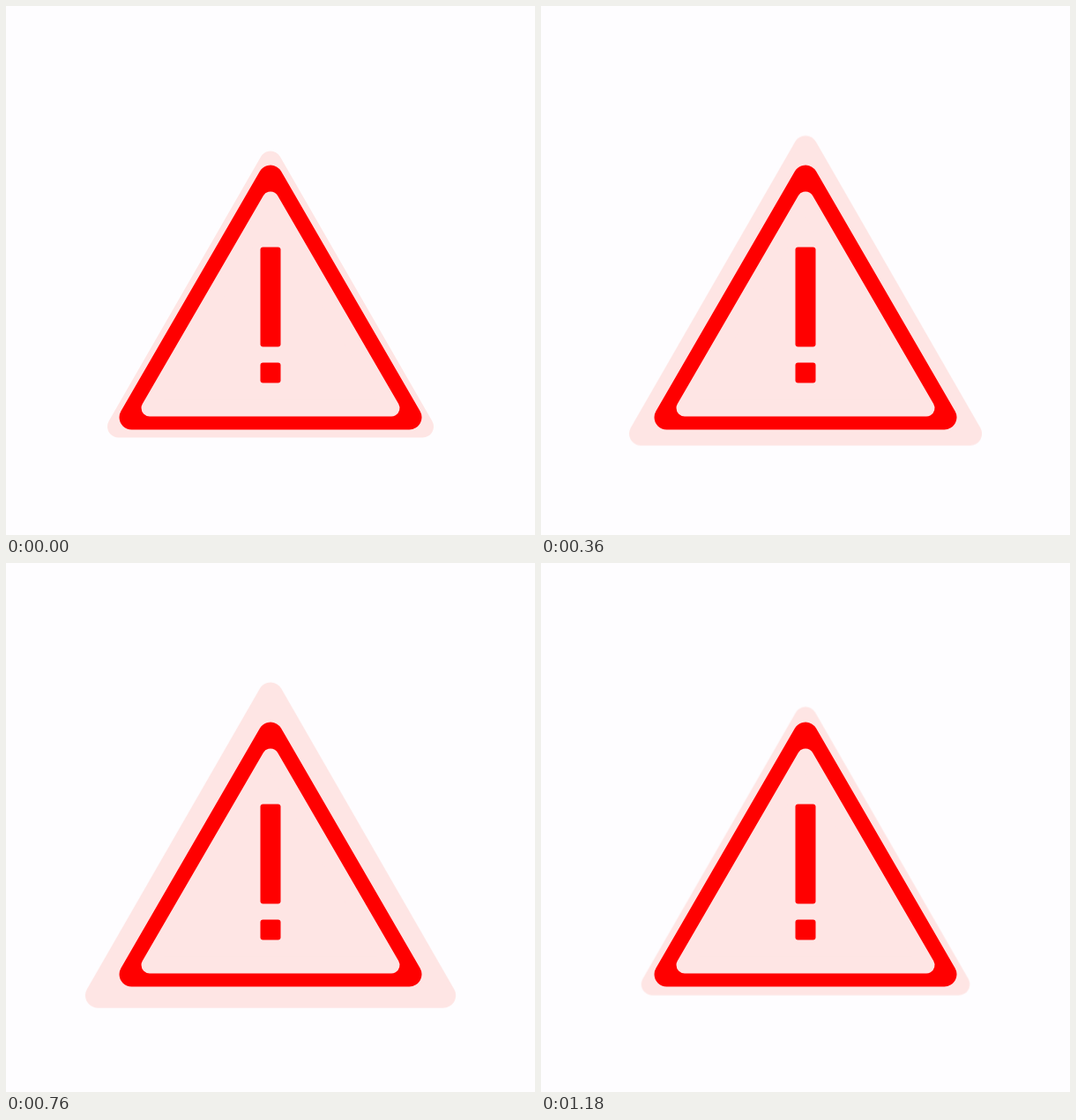
An HTML page for the animation above (1.24 s loop, 600 by 600 pixels).

```html
<!DOCTYPE html>
<html lang="en">
<head>
<meta charset="utf-8">
<title>Warning sign</title>
<style>
  html, body { margin: 0; width: 100%; height: 100%; overflow: hidden; background: #fefdff; }
  svg { display: block; width: 100%; height: 100%; }
  path { stroke-linejoin: round; }
  .pink { fill: #fee5e4; stroke: #fee5e4; }
  .red { fill: #f00; stroke: #f00; }
  .bar { fill: #f00; }
  .halo {
    transform-origin: 300px 379px;
    animation: pulse 1240ms linear infinite;
  }
  /* accelerating swell, short rest at the peak, even shrink */
  @keyframes pulse {
    0% { transform: scale(1); animation-timing-function: cubic-bezier(.33, 0, .67, .33); }
    36.3%, 41.4% { transform: scale(1.127); }
    42% { transform: scale(1.133); }
    44.4%, 58.9% { transform: scale(1.139); }
    61.3% { transform: scale(1.136); }
    71% { transform: scale(1.102); }
    95.2% { transform: scale(1.007); }
    100% { transform: scale(1); }
  }
</style>
</head>
<body>
<svg viewBox="0 0 600 600">
  <path class="pink halo" stroke-width="25" d="M300 177L472.5 477H127.5Z"/>
  <path class="red" stroke-width="28" d="M300 194.5L457.5 466.5H142.5Z"/>
  <path class="pink" stroke-width="19" d="M300 220L437 456H163Z"/>
  <rect class="bar" x="288.5" y="273.5" width="23" height="113" rx="3"/>
  <rect class="bar" x="288.5" y="404.5" width="23" height="23" rx="3"/>
</svg>
</body>
</html>
```
